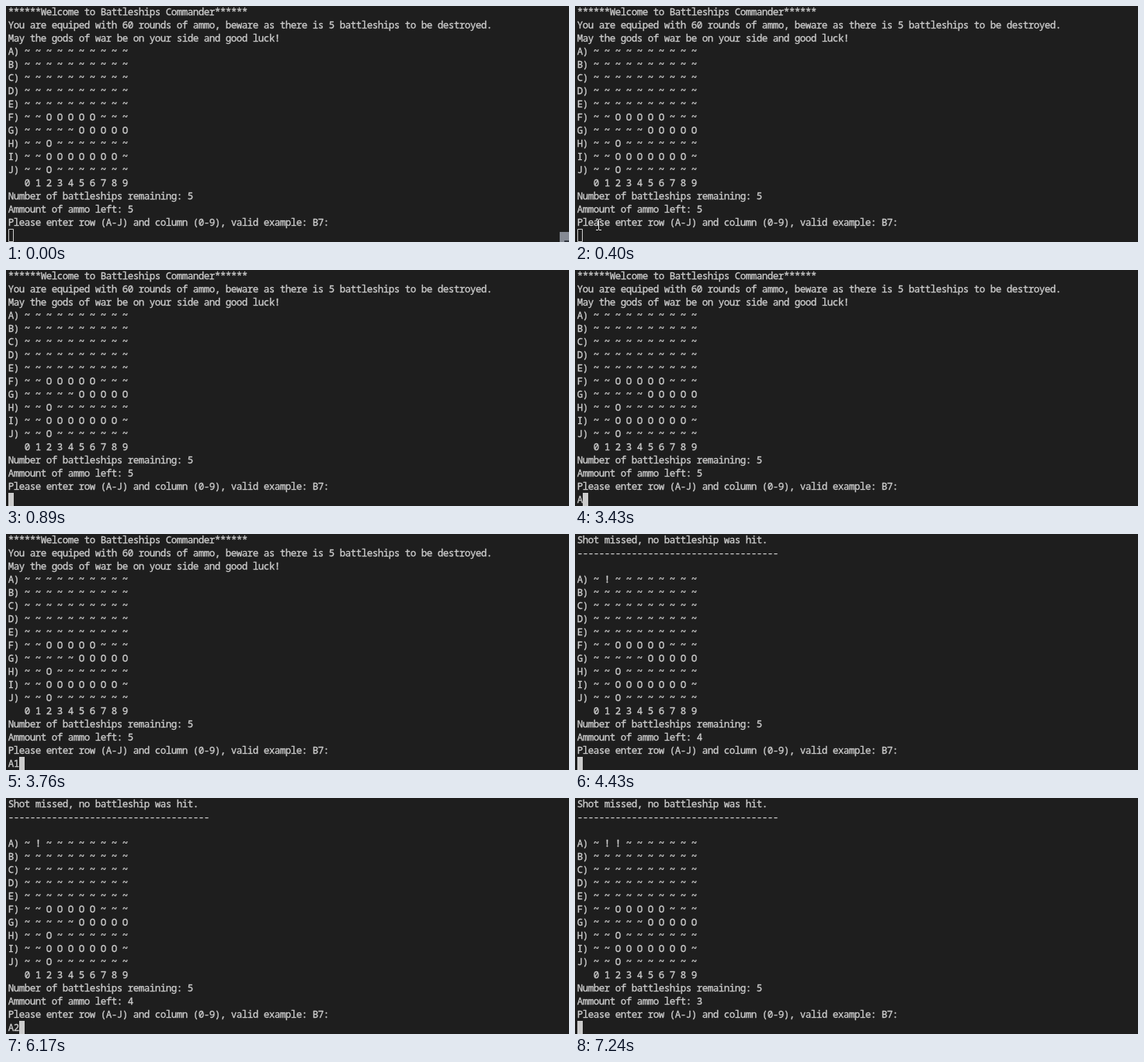
Write an HTML page with a canvas that moves like this. It is 725 by 305 pixels and loops after 8000 ms.

```html
<!DOCTYPE html>
<html lang="en">
<head>
<meta charset="utf-8">
<title>Battleships terminal</title>
<style>
html, body { margin: 0; width: 100%; height: 100%; overflow: hidden; background: #1e1e1e; }
canvas { display: block; }
</style>
</head>
<body>
<canvas id="stage" width="725" height="305"></canvas>
<script>
const ctx = document.getElementById("stage").getContext("2d");
const LOOP = 8000, LEFT = 3, CELL = 7, LINE = 17, BASELINE = 12;
const BACK = "#1e1e1e", INK = "#cccccc";

const WELCOME = [
  "******Welcome to Battleships Commander******",
  "You are equiped with 60 rounds of ammo, beware as there is 5 battleships to be destroyed.",
  "May the gods of war be on your side and good luck!"
];
const MISSED = ["Shot missed, no battleship was hit.", "-".repeat(37), ""];

// First and last occupied column of each ship row.
const SHIPS = { F: [2, 6], G: [5, 9], H: [2, 2], I: [2, 8], J: [2, 2] };

function boardRow(letter, shots) {
  const [from, to] = SHIPS[letter] || [10, 10];
  const cells = Array.from({ length: 10 }, (_, col) => {
    if (letter === "A" && col >= 1 && col <= shots) return "!";
    return col >= from && col <= to ? "O" : "~";
  });
  return letter + ") " + cells.join(" ");
}

function screenLines(shots) {
  return [
    ...(shots ? MISSED : WELCOME),
    ..."ABCDEFGHIJ".split("").map(letter => boardRow(letter, shots)),
    "   0 1 2 3 4 5 6 7 8 9",
    "Number of battleships remaining: 5",
    "Ammount of ammo left: " + (5 - shots),
    "Please enter row (A-J) and column (0-9), valid example: B7:"
  ];
}

function typedText(t) {
  if (t >= 7240) return "";
  if (t >= 6170) return "A2";
  if (t >= 5900) return "A";
  if (t >= 4430) return "";
  if (t >= 3760) return "A1";
  return t >= 3430 ? "A" : "";
}

// Each character sits centred in its terminal cell; a hairline stroke firms up the weight.
function drawLine(line, row) {
  const y = BASELINE + row * LINE;
  [...line].forEach((char, col) => {
    const x = LEFT + (col + 0.5) * CELL;
    ctx.fillText(char, x, y);
    ctx.strokeText(char, x, y);
  });
}

function drawText(lines) {
  ctx.font = '12.4px "Noto Sans Mono", monospace';
  ctx.textAlign = "center";
  ctx.fillStyle = ctx.strokeStyle = INK;
  ctx.lineWidth = 0.35;
  ctx.lineJoin = "round";
  lines.forEach(drawLine);
}

function drawCaret(column, focused) {
  const x = LEFT + column * CELL;
  if (focused) {
    ctx.fillStyle = INK;
    ctx.fillRect(x, 288, CELL, LINE);
  } else {
    ctx.strokeStyle = INK;
    ctx.lineWidth = 1;
    ctx.strokeRect(x + 0.5, 288.5, CELL - 1, LINE - 1);
  }
}

function drawCorner() {
  ctx.fillStyle = "#858a94";
  ctx.fillRect(713, 292, 12, 13);
  ctx.fillStyle = "#343941";
  ctx.fillRect(719, 303, 6, 2);
}

function drawBeam(x, y) {
  ctx.fillStyle = "#e8e8e8";
  ctx.fillRect(x, y - 6, 1, 13);
  for (const end of [-7, 7]) {
    ctx.fillRect(x - 3, y + end, 3, 1);
    ctx.fillRect(x + 1, y + end, 3, 1);
  }
}

const mix = (a, b, k) => Math.round(a + (b - a) * k);

function drawPointer(t) {
  if (t < 70) return drawCorner();
  if (t >= 890) return;
  // The pointer is sampled in coarse steps.
  const step = Math.floor((t - 70) / 66);
  if (step < 5) {
    const k = 1 - (1 - (step + 1) / 6) ** 2;
    drawBeam(mix(715, 30, k), mix(298, 282, k));
  } else {
    const k = Math.min(1, (step - 5) / 6);
    drawBeam(mix(30, 22, k), mix(282, 301, k * k));
  }
}

function draw(now) {
  const t = now % LOOP;
  const shots = t >= 7240 ? 2 : t >= 4430 ? 1 : 0;
  const typed = typedText(t);
  ctx.fillStyle = BACK;
  ctx.fillRect(0, 0, 725, 305);
  drawText([...screenLines(shots), typed]);
  drawCaret(typed.length, t >= 600);
  drawPointer(t);
}

const start = performance.now();
function tick() {
  draw(performance.now() - start);
  requestAnimationFrame(tick);
}
tick();
</script>
</body>
</html>
```
